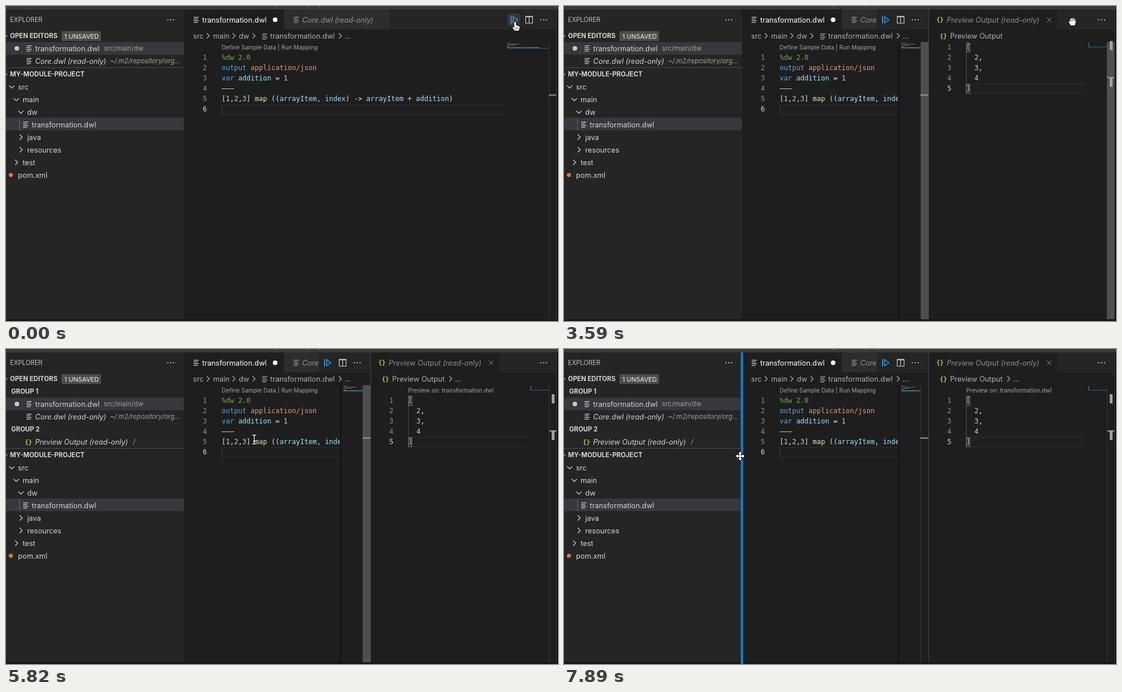
Write an HTML page with a canvas that moves like this. It is 965 px wide and 550 px high and loops after 8 s.

```html
<!DOCTYPE html>
<html lang="en">
<head>
<meta charset="utf-8">
<title>Mapping preview</title>
<style>
  html, body { margin: 0; height: 100%; overflow: hidden; background: #1e1e1e; }
  canvas { display: block; }
</style>
</head>
<body>
<canvas id="stage" width="965" height="550"></canvas>
<script>
const ctx = document.getElementById('stage').getContext('2d');
const LOOP = 8000, STEP = 149;
const UI = 'Inter, sans-serif', MONO = '"DejaVu Sans Mono", monospace';
const BG = '#1e1e1e', SIDE = '#252526', FG = '#d4d4d4', DIM = '#a2a2a2', CRUMB = '#b0b0b0', RUN = '#3b9cee';
const LENS = '#a4a4a4', LINE = '#2f2f2f';

const CODE = [
  '%dw 2.0', 'output application/json', 'var addition = 1', '–––',
  '[1,2,3] map ((arrayItem, index) -> arrayItem + addition)', ''
];
const PREVIEW = ['[', '  2,', '  3,', '  4', ']'];
const SYNTAX = [
  [/^%dw/, '#6fa854'], [/^(var|output)$/, '#4fa8ea'], [/^application/, '#e29a7c'],
  [/^(addition|arrayItem|index)$/, '#a2e2ff'], [/^map$/, '#e4e4b0'], [/^\d/, '#bdd8b0']
];

// Steps during which the caret is lit.
const BLINKS = [[1, 4], [8, 11], [14, 18], [21, 23]];
// step, x, y, cursor shape
const MOUSE = [
  [0, 890, 28, 'pointer'], [23, 890, 28, 'pointer'], [24, 889, 27, 'hand'],
  [25, 889, 27, 'hand'], [26, 872, 50, 'beam'], [30, 772, 174, 'beam'],
  [37, 442, 152, 'beam'], [39, 434, 158, 'beam'], [40, 300, 300, 'pointer'],
  [41, 153, 407, 'pointer'], [42, 215, 330, 'pointer'], [43, 262, 195, 'pointer'],
  [44, 262, 195, 'pointer'], [46, 282, 185, 'pointer'], [50, 300, 186, 'pointer'],
  [51, 306, 187, 'move'], [53, 308, 187, 'move']
];
// step, scrollbar opacity
const LEFT_SCROLL = [[0, 1], [26, 1], [30, 0], [33, 0], [34, 1], [40, 1], [44, 0]];
const RIGHT_SCROLL = [[0, 1], [33, 1], [38, 0]];

const SHAPES = {
  pointer: 'M-1.5 1Q0-1.5 1.5 1V6Q3 5 4 6.5Q6 6 6.5 7.5Q8.5 7.5 8 10L6.5 15H-1L-4.5 9.5Q-4.5 7.5-1.5 9.5Z',
  hand: 'M-5-3Q-4-5-3-3V-5Q-1.5-7-.5-5Q1-7.5 2-5Q4-6 4.5-4V-2Q6.5-3 6 0L4 7H-3L-7 1Q-6-1-4.5 1Z',
  move: 'M0-8L3.5-4H1.3V-1.3H4V-3.5L8 0L4 3.5V1.3H1.3V4H3.5L0 8L-3.5 4H-1.3V1.3H-4V3.5L-8 0L-4-3.5V-1.3H-1.3V-4H-3.5Z',
  beam: 'M-3.5-8Q0-8 0-6V6Q0 8-3.5 8M3.5-8Q0-8 0-6V6Q0 8 3.5 8M-2 3H2'
};

function track(keys, step) {
  const next = keys.findIndex(k => k[0] > step);
  if (next < 0) return keys[keys.length - 1].slice(1);
  const a = keys[next - 1], b = keys[next], p = (step - a[0]) / (b[0] - a[0]);
  return a.slice(1).map((v, i) => typeof v === 'number' ? v + (b[i + 1] - v) * p : v);
}

function rect(x, y, w, h, color, alpha = 1) {
  ctx.globalAlpha = alpha;
  ctx.fillStyle = color;
  ctx.fillRect(x, y, w, h);
  ctx.globalAlpha = 1;
}
function rounded(x, y, w, h, r, color) {
  ctx.fillStyle = color;
  ctx.beginPath();
  ctx.roundRect(x, y, w, h, r);
  ctx.fill();
}
function frame(x, y, w, h, color) {
  ctx.strokeStyle = color;
  ctx.lineWidth = 1;
  ctx.strokeRect(x + 0.5, y + 0.5, w - 1, h - 1);
}
function dot(x, y, r, color) {
  ctx.fillStyle = color;
  ctx.beginPath();
  ctx.arc(x, y, r, 0, 7);
  ctx.fill();
}
// Text is placed by its left edge and the middle of its capitals.
function text(s, x, middle, color = FG, size = 12.7, style = '', family = UI) {
  ctx.font = `${style} ${size}px ${family}`;
  ctx.fillStyle = color;
  ctx.fillText(s, x, Math.round(middle + size * 0.36));
  return ctx.measureText(s).width;
}
function path(d, x, y, color = FG, width = 1, fill) {
  ctx.save();
  ctx.translate(x, y);
  const shape = new Path2D(d);
  ctx.lineWidth = width;
  ctx.lineJoin = 'round';
  ctx.strokeStyle = color;
  ctx.stroke(shape);
  if (fill) { ctx.fillStyle = fill; ctx.fill(shape); }
  ctx.restore();
}

const italic = (s, x, y, color) => text(s, x, y, color, 12.6, 'italic');
const heading = (s, x, y) => text(s, x, y, FG, 11.3, 'bold');
const chevron = (x, y, open, color) => path(open ? 'M-4.5-2L0 2.5L4.5-2' : 'M-2-4.5L2.5 0L-2 4.5', x, y, color, 1.1);
const dots = (x, y) => [-5, 0, 5].forEach(d => dot(x + d, y, 1.1, FG));
const braces = (x, y) => text('{}', x, y, '#cbcb41', 10.5, 'bold', MONO);
const lines = (x, y, color = FG) => [9, 7, 9, 7].forEach((w, i) => rect(x, y - 5 + i * 3, w, 1.2, color));
const split = (x, y) => path('M-6-6H6V6H-6ZM0-6V6M-6-5H6', x, y, FG, 1.1);
function runIcon(x, y) {
  path('M-5-6.5V6.5', x, y, RUN, 1.7);
  path('M-1.5-5.5L6 0L-1.5 5.5Z', x, y, RUN, 1.4);
}

function tokens(line) {
  const parts = line.startsWith('%') ? [line] : line.match(/application\/json|\w+|\s+|[^\w\s]+/g) || [];
  return parts.map(s => [s, (SYNTAX.find(([re]) => re.test(s)) || [0, '#e2e2e2'])[1]]);
}
function codeBlock(source, x, numberX, top, active) {
  source.forEach((line, i) => {
    const y = top + i * 18;
    let left = x;
    text(String(i + 1), numberX, y, i === active ? '#d8d8d8' : '#8e8e8e', 12, '', MONO);
    for (const [s, color] of tokens(line)) left += text(s, left, y, color, 12, '', MONO);
  });
}
function minimap(x, width) {
  CODE.forEach((line, i) => {
    let left = 0;
    for (const [s, color] of tokens(line)) {
      const w = Math.min(s.length, width - left);
      if (s.trim() && w > 0) rect(x + left, 64 + i * 2, w, 1, color, 0.55);
      left += s.length;
    }
  });
  rect(x, 73, width, 1.5, '#1d5473');
}

function treeRow(label, x, y, arrow) {
  if (arrow) chevron(x - 11, y, arrow === 'open');
  text(label, x, y);
}

function sidebar(step, grouped) {
  rect(0, 6, 311, 544, SIDE);
  text('EXPLORER', 7, 24, '#c0c0c0', 11.1);
  dots(288, 24);
  path('M0 3L2 0', 0, 51);
  heading('OPEN EDITORS', 7, 52);
  rounded(97, 44, 69, 17, 1, '#4d4d4d');
  text('1 UNSAVED', 102, 53, '#f5f5f5', 11);

  const y = grouped ? 96 : 74;
  rect(0, y - 11, 311, 22, '#37373d');
  dot(19, y, 4, '#c8c8c8');
  lines(36, y);
  text('transformation.dwl', 51, y);
  text('src/main/dw', 171, y, DIM, 11.8);
  lines(36, y + 22);
  italic('Core.dwl (read-only)', 51, y + 22);
  text('~/.m2/repository/org...', 182, y + 22, DIM, 11.5, 'italic');
  if (grouped) {
    heading('GROUP 1', 9, 74);
    heading('GROUP 2', 9, 140);
    braces(33, 162);
    italic('Preview Output (read-only)', 51, 162);
    text('/', 222, 162, DIM, 11.5, 'italic');
  }

  const top = grouped ? 185 : 119;
  rect(0, top - 12, 311, 1, '#4a4a4b');
  path('M0 3L2 0', 0, top - 1);
  heading('MY-MODULE-PROJECT', 7, top);
  treeRow('src', 21, top + 22, 'open');
  treeRow('main', 29, top + 44, 'open');
  treeRow('dw', 37, top + 66, 'open');
  rect(0, top + 76, 311, 22, '#37373d');
  rect(23, top + 76, 1, 22, '#66666a');
  lines(30, top + 88);
  treeRow('transformation.dwl', 45, top + 88);
  treeRow('java', 37, top + 110, 'closed');
  treeRow('resources', 37, top + 132, 'closed');
  treeRow('test', 29, top + 154, 'closed');
  treeRow('pom.xml', 21, top + 176);
  dot(8.5, top + 176, 3.5, '#e37933');

  if (step >= 41 && step < 51) projectActions(step);
}

function projectActions(step) {
  if (step >= 45 && step < 49) rounded(263, 175, 21, 20, 4, '#38393a');
  const plus = 'M3 4H9M6 1V7';
  path('M0 6H-6V-7H1L5-3V-1M1-7V-3H5' + plus, 225, 185);
  path('M1 5H-7V-6H-2L0-4H7V-1M-7-2H0L2-4' + plus, 249, 185);
  path('M-3-5A6 6 0 1 0 3-5M-6-6H-2V-2', 273, 185, FG, 1.2);
  path('M-6-2H3V6H-6ZM-3-2V-6H6V3H3M-4 2H1', 297, 185);
}

function leftEditor(step, isSplit) {
  rect(311, 6, 652, 544, BG);
  rect(485, 6, 478, 35, SIDE);
  rect(486, 6, 185, 35, '#2d2d2d');
  lines(328, 24);
  text('transformation.dwl', 343, 24, '#ffffff');
  dot(470.5, 24, 4, '#ffffff');
  lines(503, 24, DIM);
  italic('Core.dwl (read-only)', 518, 24, '#969696');

  text('src', 327, 52, CRUMB);
  text('main', 362, 52, CRUMB);
  text('dw', 407, 52, CRUMB);
  lines(448, 53, CRUMB);
  text('transformation.dwl', 462, 52, CRUMB);
  text('...', 592, 52, CRUMB);
  [353, 398, 433, 584].forEach(x => chevron(x, 52, false, CRUMB));

  text('Define Sample Data | Run Mapping', 377, 72, LENS, 10.2);
  const edge = isSplit ? 586 : 872;
  rect(377, 172, edge - 377, 1, LINE);
  rect(377, 188, edge - 377, 1, LINE);
  rect(377, 172, 1, 17, '#404040');
  codeBlock(CODE, 377, 344, 90, 5);
  if (BLINKS.some(([on, off]) => step >= on && step < off)) rect(377, 171, 2, 18, '#aeafad');

  const ruler = isSplit ? 623 : 949;
  if (isSplit) {
    rect(586, 63, 51, 487, BG);
    rect(584, 63, 2, 487, '#131313');
    rect(547, 6, 90, 35, SIDE);
    minimap(590, 33);
  } else {
    minimap(876, 73);
    rounded(877, 13, 22, 22, 5, '#37393a');
  }
  rect(ruler, 63, 1, 487, '#343434');
  if (isSplit) rect(624, 63, 13, 487, '#4f4f4f', track(LEFT_SCROLL, step)[0]);
  rect(ruler, 154.5, 14, 2, '#9a9a9a');

  const x = isSplit ? 562 : 888;
  runIcon(x, 24);
  split(x + 26.5, 24);
  dots(x + 52, 24);
}

function rightEditor(step) {
  const grouped = step >= 25, top = grouped ? 90 : 72;
  rect(637, 6, 1, 544, '#444444');
  rect(638, 6, 325, 544, BG);
  rect(862, 6, 101, 35, SIDE);
  braces(651, 23);
  italic('Preview Output (read-only)', 669, 24, '#8f8f8f');
  path('M-4-4L4 4M4-4L-4 4', 848, 24, '#8f8f8f');
  dots(940, 24);
  if (step < 24) return;

  braces(657, 52);
  text('Preview Output', 675, 52, CRUMB);
  if (grouped) {
    chevron(777, 52, false, CRUMB);
    text('...', 785, 52, CRUMB);
    text('Preview on: transformation.dwl', 703, 72, LENS, 10.2);
  }
  const last = top + 72;
  rect(703, last - 8, 209, 1, LINE);
  rect(703, last + 8, 209, 1, LINE);
  rect(703, top + 9, 1, 54, '#505050');
  codeBlock(PREVIEW, 703, 670, top, 4);
  frame(703, top - 8, 7, 17, '#888888');
  frame(703, last - 8, 7, 17, '#888888');
  rect(917, 64, 1, 7, '#777777');
  rect(916, 71, 33, 1.5, '#1d5473');

  rect(949, 63, 1, 487, '#343434');
  rect(949, 63, 13, 487, '#4f4f4f', track(RIGHT_SCROLL, step)[0]);
  rect(954, top - 11, 5, 16, '#a0a0a0');
  rect(950, last - 20, 12, 2, '#a0a0a0');
  rect(954, last - 20, 5, 17, '#a0a0a0');
}

function tooltip() {
  rect(890, 44, 75, 20, '#3b3b3b');
  frame(890, 44, 75, 20, '#565656');
  text('Run Preview', 896, 54, '#e4e4e4', 10.6);
}

function cursor(step) {
  const [x, y, shape] = track(MOUSE, step);
  if (shape === 'beam') {
    path(SHAPES.beam, x, y, '#000000', 3);
    path(SHAPES.beam, x, y, '#ffffff', 1.4);
    return;
  }
  path(SHAPES[shape], x, y, '#000000', 2, '#ffffff');
  if (shape === 'pointer') path('M0 9V13M2.5 9V13M5 9V13', x, y, '#333333', 0.8);
  if (shape === 'hand') path('M-3-3V0M-.5-5V-1M2-5V-1M4.5-3V0', x, y, '#222222', 0.9);
}

function draw(now) {
  const step = Math.floor((now % LOOP + 10) / STEP);
  const isSplit = step >= 23;
  leftEditor(step, isSplit);
  if (isSplit) rightEditor(step);
  sidebar(step, step >= 25);

  rect(0, 0, 965, 6, '#3a3a3b');
  [470, 528, 547].forEach(x => rect(x, 0, 2, 1, '#b0b0b0'));
  rect(963, 6, 2, 544, '#0d0d11');
  rect(962, 6, 1, 541, '#3c3c3c');
  rect(0, 547, 965, 3, '#19131a');

  if (step >= 52) rect(309, 6, 4, 544, '#0a7fd6', step === 52 ? 0.5 : 1);
  if (step >= 3 && step < 6) tooltip();
  cursor(step);
  requestAnimationFrame(() => draw(performance.now()));
}
draw(0);
</script>
</body>
</html>
```
